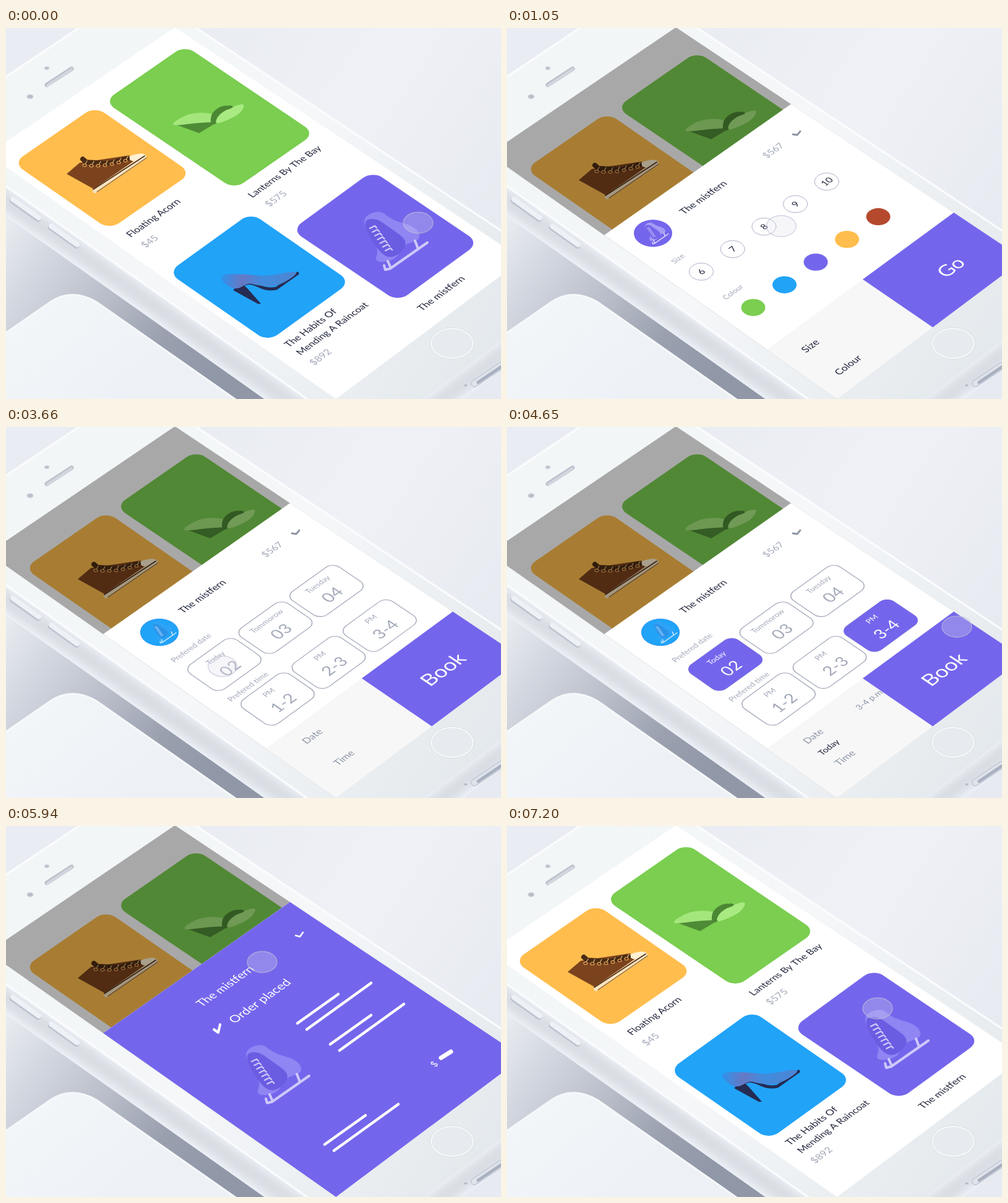
Recreate the animation shown at these times as an HTML page with a canvas. Size 800 px wide and 600 px high, loop 7230 ms.

```html
<!DOCTYPE html>
<html lang="en">
<head>
<meta charset="utf-8">
<title>Shoe shop</title>
<style>
html, body { margin: 0; width: 100%; height: 100%; overflow: hidden; background: #eaedf3; }
canvas { display: block; }
</style>
</head>
<body>
<canvas id="stage" width="800" height="600"></canvas>
<script>
const ctx = document.getElementById('stage').getContext('2d');
const LOOP = 7230, W = 427, H = 532, BAR = 372, SPLIT = 219, TOP = -263, A = 0.7072;
const PURPLE = '#7466ec', GREEN = '#7bce50', ORANGE = '#ffbd4d', BLUE = '#21a3f8', RED = '#b5492d';
const INK = '#23273d', GREY = '#a3a9b9', MID = '#8c94a4';
const ITEM = 'The mistfern';

const clamp = x => Math.max(0, Math.min(1, x));
const lerp = (a, b, k) => a + (b - a) * k;
const mix = (p, q, k) => p.map((a, i) => lerp(a, q[i], k));
const ramp = (t, a, b) => { const x = clamp((t - a) / (b - a)); return x * x * (3 - 2 * x); };
const easeOut = (t, a, b) => 1 - Math.pow(1 - clamp((t - a) / (b - a)), 3);

// Sheet coordinates (u right, v down) to stage pixels.
const project = (u, v) => [157 + A * (u + v), 335 - 0.4965 * u + 0.4981 * v - 6.16e-5 * u * v];

// Regular rows of controls, in stage pixels.
const sizeAt = i => [314 + 50.7 * i, 394 - 36.4 * i];
const swatchAt = i => [398 + 50.5 * i, 452 - 36.7 * i];
const slotAt = (i, row) => [353 + 82.5 * i + 86 * row, 384 - 59.4 * i + 56 * row];

// Runs draw() with the tilted plane's axes, origin at stage pixel x, y.
function at(x, y, draw) {
  const s = (x - 157) / A, d = (y - 335) / 0.4973;
  const u = (s - d) / 2, v = (s + d) / 2;
  ctx.save();
  ctx.transform(A, -0.4965 - 6.16e-5 * v, A, 0.4981 - 6.16e-5 * u, x, y);
  draw();
  ctx.restore();
}

function group(alpha, x, y, draw) {
  if (alpha <= 0) return;
  ctx.save();
  ctx.globalAlpha *= alpha;
  ctx.translate(x, y);
  draw();
  ctx.restore();
}

function text(str, x, y, size, color = INK) {
  at(x, y, () => {
    ctx.font = size + 'px Lato, Inter, sans-serif';
    ctx.textAlign = 'center';
    ctx.fillStyle = color;
    ctx.fillText(str, 0, size * 0.36);
  });
}

function poly(color, ...pts) {
  ctx.beginPath();
  pts.forEach(p => ctx.lineTo(...p));
  ctx.closePath();
  ctx.fillStyle = color;
  ctx.fill();
}

// Closed soft curve through the midpoints of the given corners.
function blob(color, ...pts) {
  const n = pts.length;
  const mid = i => mix(pts[i % n], pts[(i + 1) % n], 0.5);
  ctx.beginPath();
  ctx.moveTo(...mid(0));
  for (let i = 1; i <= n; i++) ctx.quadraticCurveTo(...pts[i % n], ...mid(i));
  ctx.fillStyle = color;
  ctx.fill();
}

function line(color, width, ...pts) {
  ctx.beginPath();
  pts.forEach(p => ctx.lineTo(...p));
  ctx.strokeStyle = color;
  ctx.lineWidth = width;
  ctx.lineCap = ctx.lineJoin = 'round';
  ctx.stroke();
}

function quad(u0, v0, u1, v1, color) {
  poly(color, project(u0, v0), project(u1, v0), project(u1, v1), project(u0, v1));
}

function oval(x, y, r, fill, stroke, width = 1) {
  ctx.beginPath();
  ctx.ellipse(x, y, r, r * 0.71, 0, 0, Math.PI * 2);
  if (fill) { ctx.fillStyle = fill; ctx.fill(); }
  if (stroke) { ctx.strokeStyle = stroke; ctx.lineWidth = width; ctx.stroke(); }
}

function card(x, y, w, h, r, fill, stroke) {
  at(x, y, () => {
    ctx.beginPath();
    ctx.roundRect(-w / 2, -h / 2, w, h, r);
    ctx.fillStyle = fill;
    ctx.fill();
    if (stroke) { ctx.strokeStyle = stroke; ctx.lineWidth = 1.5; ctx.stroke(); }
  });
}

function shade(x0, y0, x1, y1, ...colors) {
  const g = ctx.createLinearGradient(x0, y0, x1, y1);
  colors.forEach((c, i) => g.addColorStop(i / (colors.length - 1), c));
  return g;
}

function backdrop() {
  ctx.fillStyle = shade(300, 0, 800, 330, '#e9ecf2', '#eff1f6', '#e7eaf1');
  ctx.fillRect(0, 0, 800, 600);
  poly(shade(0, 310, 340, 560, '#e9ecf1', '#cfd4dd', '#b7bcc8', '#9aa0ae', '#9097a7'),
    [0, 260], [0, 600], [480, 600]);

  // Neighbouring handset
  ctx.beginPath();
  ctx.moveTo(-9, 499);
  ctx.lineTo(72, 443);
  ctx.quadraticCurveTo(106, 420, 146, 443);
  ctx.lineTo(380, 607);
  ctx.lineTo(-9, 607);
  ctx.closePath();
  ctx.fillStyle = shade(60, 430, 200, 600, '#f3f6f9', '#edf0f5');
  ctx.fill();
  ctx.strokeStyle = '#f6f8fa';
  ctx.lineWidth = 3;
  ctx.stroke();
}

function handset() {
  const face = color => quad(-33, TOP - 110, W + 25, H + 104, color);
  // The metal side is a stack of slices below the face.
  for (let d = 48; d > 0; d -= 2) {
    const c = Math.round(236 - 18 * Math.sin(Math.PI * d / 48));
    group(1, 0, d, () => face(`rgb(${c},${c + 4},${c + 10})`));
  }
  for (const x of [10, 72]) {
    const y = 270 + 0.7 * x;
    line('#bcc4d0', 9, [x, y + 2], [x + 42, y + 32]);
    line('#eef1f6', 8, [x + 1, y], [x + 43, y + 30]);
  }
  line('#c2c9d5', 12, [757, 575], [800, 546]);
  line('#dfe4eb', 9, [757, 575], [800, 546]);
  line('#a9b1c0', 5, [763, 573], [800, 548]);
  oval(743, 578, 3.5, '#b5bdca', '#e6eaf0');

  face(shade(30, 60, 760, 540, '#f2f6f7', '#f5f7f9', '#e4e9ed'));
  line('#fbfcfd', 3, project(-32, H + 104), project(-32, TOP - 109), project(W + 23, TOP - 109), project(W + 23, H + 103));

  line('#bcc2cb', 7, [66, 92], [106, 66]);
  line('#d2d7df', 4, [67, 93], [106, 67]);
  oval(66, 65, 4, '#bcc2cb', '#dfe4e8');
  oval(39, 111, 5, '#b8bec8', '#d8dde2', 1.5);
  oval(721, 510, 34.5, '#e7ebef', '#d3d9df', 2.5);
  oval(721, 510, 34, null, '#fbfcfd', 1.8);
}

function sneaker() {
  poly('#7b431d', [98, 236], [119, 218], [199, 206], [208, 214], [143, 261]);
  line('#f7e4bd', 8, [144, 263], [223, 209]);
  blob('#fff0d2', [194, 208], [222, 201], [228, 210], [206, 218]);
  line('#54301c', 1.8, [141, 261], [224, 207]);
  line('#8a5a2c', 1.2, [147, 265], [227, 210]);
  line('#4a2b14', 8, [124, 212], [130, 217], [165, 219], [196, 211]);
  for (let i = 0; i < 7; i++) {
    const x = 127 + i * 11, y = 222 + 3 * Math.sin(i * 0.6) - i;
    line('#e3bd7c', 1.2, [x + 4, y - 7], [x, y]);
    oval(x, y, 3, '#5e2d14', '#e8ad5c', 1.1);
  }
}

function sandal() {
  poly('#4f8b36', [271, 155], [346, 149], [332, 158], [312, 170]);
  blob('#a4e67c', [260, 160], [294, 137], [336, 137], [346, 152], [310, 153]);
  blob('#4c8734', [330, 156], [332, 136], [352, 124], [368, 128], [340, 156]);
  blob('#a9ea82', [336, 156], [346, 136], [388, 119], [380, 138], [354, 151]);
  blob('#4c8734', [346, 132], [360, 124], [370, 128], [352, 134]);
}

function pump() {
  poly('#252b52', [367, 424], [380, 412], [390, 421], [412, 446], [407, 446]);
  ctx.beginPath();
  ctx.moveTo(372, 422);
  ctx.bezierCurveTo(402, 398, 406, 428, 437, 421);
  ctx.lineTo(471, 397);
  ctx.strokeStyle = '#252b52';
  ctx.lineWidth = 5;
  ctx.stroke();
  blob(shade(348, 400, 450, 412, '#2f93ec', '#6678c4', '#418cdd', '#4a86d6'),
    [338, 398], [390, 398], [420, 402], [482, 390], [438, 420], [404, 416], [392, 412], [368, 426]);
}

// Skate centred on x, y.
function skate(x, y, k, body = '#8f85f3', dark = '#6a5de2', pale = '#cfc9fa') {
  ctx.save();
  ctx.translate(x, y);
  ctx.scale(k, k);
  ctx.translate(-630, -345);
  blob(body, [571, 310], [603, 293], [624, 311], [662, 321], [672, 342], [642, 350],
    [630, 376], [594, 380], [604, 356]);
  blob(dark, [574, 314], [596, 306], [622, 324], [652, 346], [630, 372], [606, 368]);
  for (let i = 0; i < 7; i++) {
    const lx = 588 + i * 4.2, ly = 324 + i * 6;
    line(pale, 2.4, [lx, ly], [lx + 8, ly - 4], [lx + 11, ly - 1]);
  }
  line(pale, 4, [617, 377], [621, 386]);
  line(pale, 4, [661, 344], [666, 357]);
  line(pale, 4, [611, 384], [613, 391], [621, 389], [681, 347]);
  ctx.restore();
}

function shop() {
  card(329, 144.5, 184, 297, 22, GREEN);
  card(155.5, 226.5, 187, 220, 22, ORANGE);
  card(409.5, 403, 189, 228, 22, BLUE);
  card(613, 337, 185, 243, 22, PURPLE);
  sneaker();
  sandal();
  pump();
  skate(630, 345, 1);
  text('Floating Acorn', 238, 307, 18);
  text('$45', 232, 345, 18, GREY);
  text('Lanterns By The Bay', 450, 232, 17.6);
  text('$575', 436, 276, 18, GREY);
  text('The Habits Of', 492, 485, 18);
  text('Mending A Raincoat', 527, 486, 17.6);
  text('$892', 508, 532, 18, GREY);
  text(ITEM, 703, 429, 18);
}

function options(t) {
  const sized = ramp(t, 1280, 1400), tinted = ramp(t, 1840, 1950);
  text('Size', 276, 373, 14, GREY);
  text('Colour', 365, 427, 14, GREY);
  [GREEN, BLUE, PURPLE, ORANGE, RED].forEach((color, i) => {
    const [x, y] = sizeAt(i), on = i === 2 ? sized : 0;
    oval(x, y, 19.5, '#fff', '#a9afc6');
    group(on, 0, 0, () => oval(x, y, 20, PURPLE));
    text(String(6 + i), x, y, 17, on > 0.5 ? '#fff' : INK);
    oval(...swatchAt(i), 19.5, color);
  });
  group(tinted, 0, 0, () => line('#fff', 3, [444, 413], [450, 419], [453, 408]));
}

function slots(t) {
  text('Prefered date', 299, 357, 14.5, GREY);
  text('Prefered time', 391, 420, 14.5, GREY);
  const slot = (i, row, label, value, on = 0) => {
    const [x, y] = slotAt(i, row);
    card(x, y, 107, 79, 16, '#fff', '#a2a8b9');
    group(on, 0, 0, () => card(x, y, 108, 80, 16, PURPLE));
    const color = on > 0.5 ? '#fff' : GREY;
    text(label, x - 14.5, y - 10.5, 14.2, color);
    text(value, x + 9, y + 6, 30, color);
  };
  ['Today', 'Tommorow', 'Tuesday'].forEach((day, i) => {
    slot(i, 0, day, '0' + (i + 2), i === 0 ? ramp(t, 3690, 3800) : 0);
    slot(i, 1, 'PM', `${i + 1}-${i + 2}`, i === 2 ? ramp(t, 4230, 4340) : 0);
  });
}

function bar(t, swap) {
  quad(0, BAR, W, H + 2, '#f7f7f8');
  group(1 - swap, -30 * swap, 21 * swap, () => {
    text('Size', 490, 514, 18.5);
    text('Colour', 551, 545, 18);
    const k = ramp(t, 1330, 1750), m = ramp(t, 1880, 2230);
    if (k) text('8', ...mix(sizeAt(2), [575, 458], k), lerp(17, 33, k));
    if (m) oval(...mix(swatchAt(1), [629, 491], m), lerp(19.5, 16.5, m), BLUE);
  });
  group(swap, 30 * (1 - swap), -21 * (1 - swap), () => {
    text('Date', 495, 500, 18, MID);
    text('Time', 546, 535, 18, MID);
    const k = ramp(t, 3740, 4200), m = ramp(t, 4390, 4900);
    if (k) text('Today', ...mix(slotAt(0, 0), [520, 518], k), 16);
    if (m) text('3-4 p.m', ...mix(slotAt(2, 1), [567, 553], m), 16, m < 0.7 ? MID : INK);
  });
  quad(SPLIT, BAR, W + 1, H + 2, PURPLE);
  group(1 - swap, 0, 0, () => text('Go', 717, 387, 36, '#fff'));
  group(swap, 0, 0, () => text('Book', 706, 392, 37.5, '#fff'));
}

function receipt() {
  line('#fff', 2.5, [468, 177], [475, 179], [480, 172]);
  text(ITEM, 354, 259, 22, '#fff');
  text('Order placed', 410, 283, 23, '#fff');
  line('#fff', 4, [336, 329], [343, 334], [346, 321]);
  skate(439, 402, 1);
  for (const [x, y] of [[471, 319], [524, 353], [515, 515]]) {
    line('#fff', 4.5, [x, y], [x + 66, y - 47]);
    line('#fff', 4.5, [x + 15, y + 10], [x + 119, y - 65]);
  }
  text('$', 692, 385, 17, '#fff');
  line('#fff', 7, [703, 375], [719, 365]);
}

function sheet(t) {
  const swap = ramp(t, 2750, 3250), grow = ramp(t, 4950, 5450);
  quad(0, 0, W + 1, H + 2, '#fff');
  line(MID, 2.8, [462, 172], [469, 173], [474, 167]);
  text(ITEM, 317, 274, 18);
  text('$567', 430, 198, 17.5, GREY);

  const x = 236 + 12 * swap, tint = ramp(t, 1880, 2100);
  oval(x, 332, 31, PURPLE);
  group(1 - tint, 0, 0, () => skate(x + 6, 332, 0.37, '#a49bf5', PURPLE, '#e4e1fc'));
  group(tint, 0, 0, () => {
    oval(x, 332, 31, BLUE);
    skate(x + 8, 332, 0.37, '#2fa3f6', '#2b93e8', '#d5e9fb');
  });

  const slide = 90 * swap, rest = 90 - slide;
  group(1 - swap, -slide, slide * 0.71, () => options(t));
  group(swap, rest, -rest * 0.71, () => slots(t));

  const rise = 170 * (1 - easeOut(t, 600, 1000));
  group(1, A * rise, 0.485 * rise, () => bar(t, swap));

  if (grow) {
    quad(lerp(SPLIT, 0, grow), lerp(BAR, 0, grow), W + 1, H + 2, PURPLE);
    const show = ramp(t, 5350, 5800), drop = 24 * (1 - show);
    group(show, drop, drop * 0.68, receipt);
  }
}

// Each stop is the moment of a tap and the place tapped.
const STOPS = [
  [200, [666, 315]], [1300, sizeAt(2)], [1850, swatchAt(1)], [2400, [747, 357]],
  [3690, [350, 387]], [4230, slotAt(2, 1)], [4690, [727, 323]],
  [5950, [414, 220]], [6250, [473, 177]], [7200, [599, 295]]
];

function touch(t) {
  const next = STOPS.findIndex(s => t < s[0]);
  const i = next < 0 ? STOPS.length - 1 : next;
  const [t0, from] = STOPS[Math.max(0, i - 1)], [t1, to] = STOPS[i];
  const press = STOPS.reduce((s, [when]) => s + Math.max(0, 1 - Math.abs(t - when - 30) / 70), 0);
  const still = t < 300 || t > 5900 && t < 6000 || t > 7100 || t > 4600 && t < 4720;
  const [x, y] = mix(from, to, ramp(t, t0 + 90, t1 - 50));
  oval(x, y, 24 - (still ? 0 : 4 * press), 'rgba(222,223,234,.28)', 'rgba(190,193,214,.75)', 1.2);
}

function render(t) {
  backdrop();
  handset();
  const shown = easeOut(t, 60, 780) * (1 - ramp(t, 6250, 6800));
  ctx.save();
  quad(0, TOP, W, H, '#fff');
  ctx.clip();
  group(1, 18 * shown, 10 * shown, shop);
  if (shown > 0) {
    quad(-2, TOP - 2, W + 2, H + 2, `rgba(0,0,0,${0.34 * shown})`);
    const off = (H + 30) * (1 - shown);
    group(1, A * off, 0.485 * off, () => sheet(t));
  }
  ctx.restore();
  touch(t);
}

function frame(now) {
  render(now % LOOP);
  requestAnimationFrame(frame);
}
render(0);
requestAnimationFrame(frame);
</script>
</body>
</html>
```
